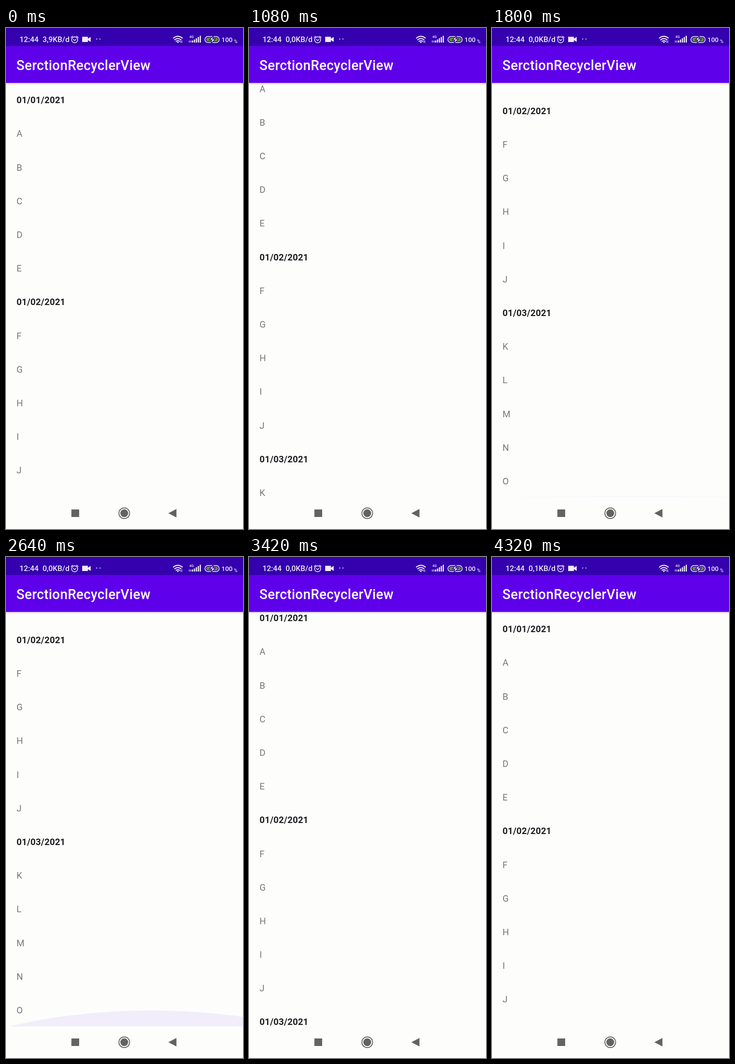
An HTML page that plays this animation: 473 px wide and 1000 px high, repeating every 4.38 s.

```html
<!DOCTYPE html>
<html lang="en">
<head>
<meta charset="utf-8">
<title>Section list</title>
<style>
  html, body { margin: 0; width: 100%; height: 100%; overflow: hidden; background: #fdfefc; }
  svg { display: block; width: 100%; height: 100%; font-family: Roboto, sans-serif; }
  .row { font-size: 18px; fill: #757575; }
  .head { font-weight: 700; fill: #1f1f22; letter-spacing: .15px; }
  .glow { fill: #6200ee; }
  .status { fill: #f1ebfa; font-weight: 500; }
  .line { fill: none; stroke: #f1ebfa; stroke-width: 1.5; }
</style>
</head>
<body>
<svg viewBox="0 0 473 1000">
  <defs>
    <clipPath id="viewport"><rect y="110" width="473" height="827"/></clipPath>
    <linearGradient id="shadow" x2="0" y2="1">
      <stop stop-color="#201040" stop-opacity=".13"/>
      <stop offset="1" stop-color="#201040" stop-opacity="0"/>
    </linearGradient>
  </defs>

  <rect width="473" height="1000" fill="#fdfefc"/>
  <g clip-path="url(#viewport)">
    <g id="list"></g>
    <ellipse id="topGlow" class="glow"/>
    <ellipse id="bottomGlow" class="glow"/>
  </g>

  <!-- app bar -->
  <rect y="109.700" width="473" height="5" fill="url(#shadow)"/>
  <rect y="36" width="473" height="73.700" fill="#5f00eb"/>
  <text x="20.800" y="83.500" font-size="26.800" font-weight="500" letter-spacing=".335" fill="#fff">SerctionRecyclerView</text>

  <!-- status bar -->
  <rect width="473" height="36" fill="#3500ae"/>
  <g class="status">
    <text x="27" y="28" font-size="15">12:44</text>
    <text id="speed" x="73" y="28" font-size="15"></text>
    <path d="M152 17.500h11.500v3.700l5.500-3.500v10l-5.500-3.500v3.700H152z"/>
    <circle cx="181" cy="22" r="1.100"/>
    <circle cx="187.500" cy="22" r="1.100"/>
    <text x="366" y="20" font-size="7">4G</text>
    <path id="signal"/>
    <path d="M365 25h1.500v4H365zM368 25h1.500v4H368z" opacity=".8"/>
    <text x="430" y="28" font-size="13">100</text>
    <text x="455" y="29.500" font-size="9.500">%</text>
  </g>
  <g class="line">
    <circle cx="137" cy="23.500" r="6"/>
    <path d="M129.500 19.500l4-3.500M144.500 19.500l-4-3.500M134 22.500l3 2.500 3-2.500"/>
    <path d="M333.500 20.500Q343 12.500 352.500 20.500M336 24Q343 18 350 24M338.800 27Q343 23.500 347.200 27" stroke-width="2"/>
  </g>
  <circle cx="343" cy="28.500" r="1.500" class="status"/>
  <path d="M348 25.500l4 4m0-4l-4 4" class="line" stroke-width="1" opacity=".6"/>
  <rect x="397" y="17" width="28.500" height="12" rx="6" class="line"/>
  <rect x="399.500" y="19.300" width="23.500" height="7.400" rx="3.700" fill="#5f8f35"/>
  <path d="M414 15.500l-8 8.500h5l-2 7 9-9h-5.500z" fill="#fff" stroke="#3500ae" stroke-width="1.300"/>

  <!-- navigation bar -->
  <g fill="#626462">
    <rect x="130.500" y="961" width="15.500" height="15"/>
    <circle cx="236" cy="968.500" r="7.800"/>
    <circle cx="236" cy="968.500" r="10.700" fill="none" stroke="#626462" stroke-width="1.700"/>
    <path d="M324 968.500l16.200-8.500v17z"/>
  </g>
</svg>

<script>
const LOOP = 4380, STEP = 60, ROW = 67.18;
const LIST_TOP = 110, LIST_BOTTOM = 937, WIDTH = 473;
// The overscroll glow is a 60 degree arc, squashed vertically.
const GLOW_RADIUS = WIDTH * 1.2;
const GLOW_HEIGHT = GLOW_RADIUS * (1 - Math.cos(Math.PI / 6));

const scrollKeys = [
  [840, 0], [960, 35], [1080, 89.7], [1320, 220], [1500, 310], [1620, 355], [1740, 381.5],
  [2700, 381.5], [2820, 335], [2940, 262], [3120, 149.5], [3300, 62], [3420, 22], [3540, 0]
];
// time, height factor, opacity
const topKeys = [[3540, 0, 0], [3660, .5, .09], [3780, .68, .14], [3900, .42, .087], [4080, .15, .03], [4260, 0, 0]];
const bottomKeys = [[1740, 0, 0], [1800, .05, .02], [2200, .12, .025], [2460, .52, .09], [2640, .42, .068], [2700, 0, 0]];

const byId = id => document.getElementById(id);
const list = byId("list"), speed = byId("speed");

function addRow(label, index, heading) {
  const row = document.createElementNS("http://www.w3.org/2000/svg", "text");
  row.setAttribute("class", heading ? "row head" : "row");
  row.setAttribute("x", 21);
  row.setAttribute("y", 150.3 + ROW * index);
  row.textContent = label;
  list.append(row);
}

["ABCDE", "FGHIJ", "KLMNO"].forEach((letters, section) => {
  addRow(`01/0${section + 1}/2021`, section * 6, true);
  [...letters].forEach((letter, i) => addRow(letter, section * 6 + i + 1));
});

byId("signal").setAttribute("d", [4, 6, 8.5, 11, 13.5]
  .map((height, i) => `M${371 + i * 3.9} 29v${-height}h2.4v${height}z`).join(""));

function sample(keys, time, column = 1) {
  const next = keys.findIndex(key => key[0] > time);
  if (next === 0) return keys[0][column];
  if (next < 0) return keys[keys.length - 1][column];
  const a = keys[next - 1], b = keys[next];
  return a[column] + (b[column] - a[column]) * (time - a[0]) / (b[0] - a[0]);
}

function drawGlow(id, keys, time, centerX, edge, direction) {
  const scale = sample(keys, time);
  const attributes = {
    cx: centerX,
    cy: edge + direction * (GLOW_HEIGHT - GLOW_RADIUS) * scale,
    rx: GLOW_RADIUS,
    ry: GLOW_RADIUS * scale,
    opacity: sample(keys, time, 2)
  };
  for (const name in attributes) byId(id).setAttribute(name, attributes[name]);
}

function draw(now) {
  const time = Math.floor(now % LOOP / STEP) * STEP;
  list.setAttribute("transform", `translate(0 ${-sample(scrollKeys, time)})`);
  drawGlow("topGlow", topKeys, time, 275, LIST_TOP, 1);
  drawGlow("bottomGlow", bottomKeys, time, 290, LIST_BOTTOM, -1);
  speed.textContent = time < 480 ? "3,9KB/d" : time < 4080 ? "0,0KB/d" : "0,1KB/d";
  requestAnimationFrame(() => draw(performance.now() - start));
}

const start = performance.now();
draw(0);
</script>
</body>
</html>
```
